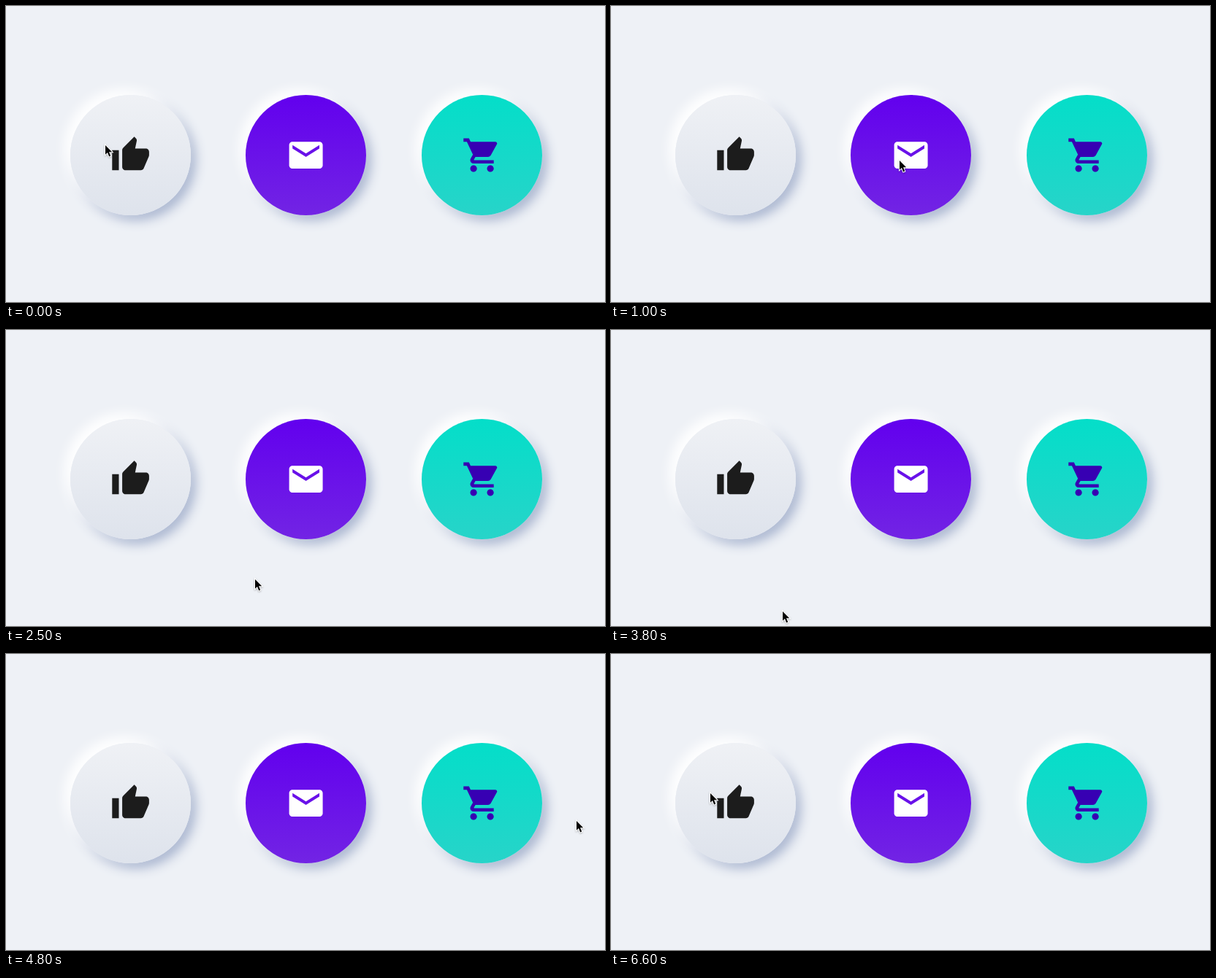
These frames come from a looping animation (820 by 406 pixels, 6700 ms). An HTML page:

```html
<!DOCTYPE html>
<html lang="en">
<head>
<meta charset="utf-8">
<title>Soft buttons</title>
<style>
  html, body { margin: 0; width: 100%; height: 100%; overflow: hidden; background: #eef1f6; }
  .btn { position: absolute; top: 122px; width: 165px; height: 165px; border-radius: 50%; }
  .btn svg { position: absolute; left: 55px; top: 54.7px; width: 55.2px; height: 55.2px; }
  #like { left: 87.5px; background: linear-gradient(#eff1f5, #dee3ec); fill: #1c1c1c; }
  #mail { left: 328px; background: linear-gradient(#6200ee, #7224e4); fill: #fff; }
  #cart { left: 568.5px; background: linear-gradient(#04dec9, #27d4c9); fill: #3700b3; }
  #cursor { position: absolute; left: 0; top: 0; overflow: visible; filter: drop-shadow(0 1px 1px #0004); }
</style>
</head>
<body>
<div class="btn" id="like"><svg viewBox="0 0 24 24"><path d="M1 21h4V9H1v12zm22-11c0-1.1-.9-2-2-2h-6.31l.95-4.57.03-.32c0-.41-.17-.79-.44-1.06L14.17 1 7.59 7.59C7.22 7.95 7 8.45 7 9v10c0 1.1.9 2 2 2h9c.83 0 1.54-.5 1.84-1.22l3.02-7.05c.09-.23.14-.47.14-.73v-2z"/></svg></div>
<div class="btn" id="mail"><svg viewBox="0 0 24 24"><path d="M20 4H4c-1.1 0-1.99.9-1.99 2L2 18c0 1.1.9 2 2 2h16c1.1 0 2-.9 2-2V6c0-1.1-.9-2-2-2zm0 4l-8 5-8-5V6l8 5 8-5v2z"/></svg></div>
<div class="btn" id="cart"><svg viewBox="0 0 24 24"><path d="M7 18c-1.1 0-1.99.9-1.99 2S5.9 22 7 22s2-.9 2-2-.9-2-2-2zM1 2v2h2l3.6 7.59-1.35 2.45c-.16.28-.25.61-.25.96 0 1.1.9 2 2 2h12v-2H7.42c-.14 0-.25-.11-.25-.25l.03-.12.9-1.63h7.45c.75 0 1.41-.41 1.75-1.03l3.58-6.49c.08-.14.12-.31.12-.48 0-.55-.45-1-1-1H5.21l-.94-2H1zm16 16c-1.1 0-1.99.9-1.99 2s.89 2 1.99 2 2-.9 2-2-.9-2-2-2z"/></svg></div>
<svg id="cursor" width="12" height="19"><path d="M0 0V12.8L3 10 5.2 15.4 7.2 14.6 5 9.3H9.2Z" stroke="#fff" stroke-width="2" paint-order="stroke"/></svg>
<script>
const LOOP = 6700, STEP = 100, TURN = 6600;
const cursor = document.getElementById('cursor');

// time, x, y
const path = [
  [0, 136, 191], [700, 136, 191], [1000, 395, 212], [1400, 395, 212],
  [1700, 806, 224], [1800, 781, 229], [1900, 680, 222], [2000, 645, 215],
  [2300, 645, 215], [2600, 235, 386]
];

// press start, fully down, release start, fully up
const presses = {
  like: [200, 500, 600, 900],
  mail: [1000, 1200, 1200, 1500],
  cart: [2000, 2200, 2200, 2500]
};

const ramp = (t, a, b) => {
  const k = Math.min(1, Math.max(0, (t - a) / (b - a)));
  return k * k * (3 - 2 * k);
};

function cursorAt(t) {
  const i = path.findIndex(p => p[0] > t);
  if (i < 0) return path[path.length - 1].slice(1);
  const [t0, x0, y0] = path[i - 1], [t1, x1, y1] = path[i];
  const k = ramp(t, t0, t1);
  return [x0 + (x1 - x0) * k, y0 + (y1 - y0) * k];
}

function shadow(p) {
  const up = 1 - p;
  return `${-8 * up}px ${-8 * up}px ${16 * up}px #fff,` +
    `${7 * up}px ${7 * up}px ${15 * up}px #aab6d0,` +
    `inset ${7 * p}px ${7 * p}px ${15 * p}px rgba(40,55,110,${0.3 * p}),` +
    `inset ${-6 * p}px ${-6 * p}px ${14 * p}px rgba(255,255,255,${0.25 * p})`;
}

function draw(now) {
  const step = Math.floor(now % LOOP / STEP) * STEP;
  const t = Math.min(step, TURN - step); // plays forward, then back
  for (const id in presses) {
    const [a, b, c, d] = presses[id];
    document.getElementById(id).style.boxShadow = shadow(ramp(t, a, b) - ramp(t, c, d));
  }
  const [x, y] = cursorAt(t).map(Math.round);
  cursor.style.transform = `translate(${x}px, ${y}px)`;
}

const start = performance.now();
(function tick() {
  draw(performance.now() - start);
  requestAnimationFrame(tick);
})();
</script>
</body>
</html>
```
